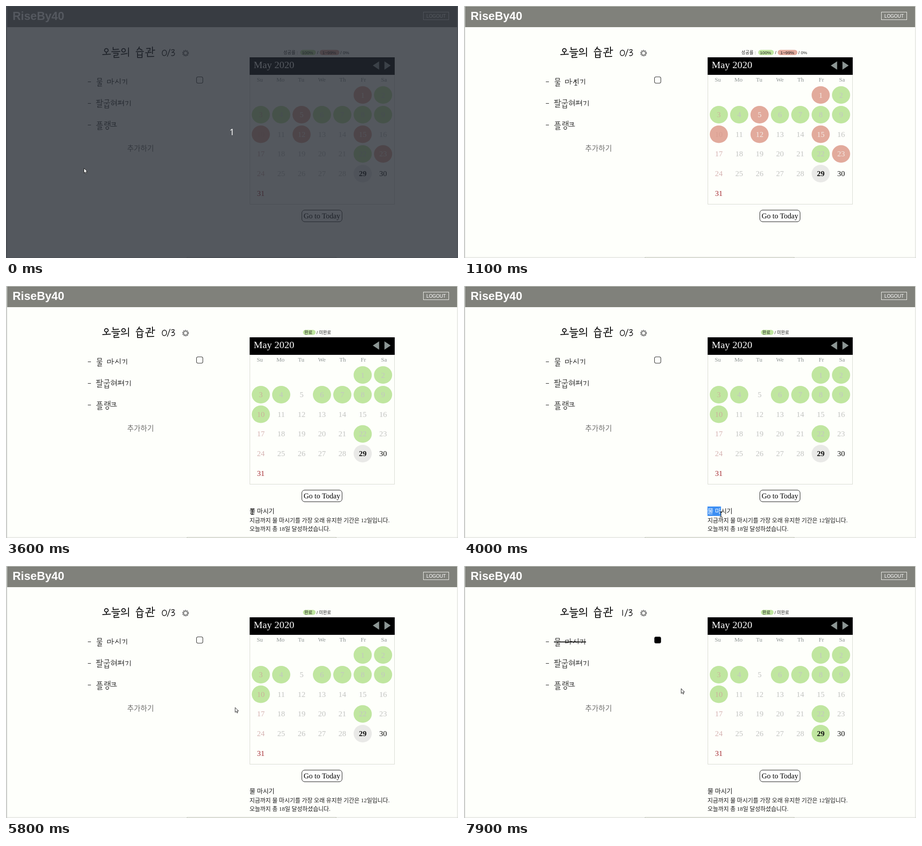
Write an HTML page that moves like this. It is 1000 px wide and 560 px high and loops after 8000 ms.

```html
<!DOCTYPE html>
<html lang="ko">
<head>
<meta charset="utf-8">
<title>오늘의 습관</title>
<style>
html, body { margin: 0; width: 100%; height: 100%; overflow: hidden; background: #fefffb; }
svg { display: block; width: 1000px; height: 560px; }
text { white-space: pre; }
.sans { font-family: "Liberation Sans", "Noto Sans CJK KR", sans-serif; }
.serif { font-family: "Liberation Serif", "Noto Sans CJK KR", serif; }
.cjk { font-family: "Noto Sans CJK KR", sans-serif; }
.mid { text-anchor: middle; }
.pen { fill: none; stroke: #161616; stroke-linecap: round; stroke-linejoin: round; }
</style>
</head>
<body>
<svg id="stage" viewBox="0 0 1000 560">
  <defs><clipPath id="picked"></clipPath></defs>
  <rect width="1000" height="560" fill="#fefffb"/>
  <path d="M0 .5H1000M998.7 0V560M0 558.8H1000" stroke="#d3d5d0" fill="none"/>
  <rect width="2.4" height="560" fill="#c9cac8"/>
  <rect x="400.5" y="558.5" width="330" height="3" fill="#f2f3ec" stroke="#b9bcb2"/>
  <rect x="2.5" y="1" width="995.5" height="46" fill="#80817b"/>
  <text class="sans" x="14.5" y="31" font-size="25.4" font-weight="700" fill="#fff">RiseBy40</text>
  <rect x="923.5" y="13.5" width="56" height="17" fill="none" stroke="#f4f4f0"/>
  <text class="sans mid" x="951.5" y="25.7" font-size="10.2" fill="#fff">LOGOUT</text>

  <g id="hand"></g>
  <g id="gear" fill="none" stroke="#6b6b6b">
    <circle cx="397.3" cy="104.8" r="6.4" stroke-width="1.8" stroke-dasharray="2.2 1.82"/>
    <circle cx="397.3" cy="104.8" r="4.5" stroke="#777" stroke-width="2.6"/>
    <circle cx="397.3" cy="104.8" r="4.6" stroke="#b5b5b5" stroke-width=".8"/>
  </g>
  <rect id="box" x="421.5" y="157.5" width="14" height="14" rx="3.5" stroke="#2b2b2b" stroke-width="1.1"/>
  <path id="strike" d="M199 168.8H270" stroke="#111" stroke-width="1.9"/>
  <text class="cjk" x="268" y="322" font-size="16.1" fill="#6f6f6d">추가하기</text>

  <g id="summary" class="sans" font-size="9.7" fill="#222">
    <rect x="651" y="97.5" width="34.5" height="11.5" rx="5.7" fill="#c0e6a0"/>
    <rect x="694" y="97.5" width="43.5" height="11.5" rx="5.7" fill="#e2aa9c"/>
    <text x="613.6" y="106.7">성공률 :</text>
    <text x="654.7" y="106.7">100%</text>
    <text x="688.3" y="106.7">/</text>
    <text x="700" y="106.7">1~99%</text>
    <text x="739.8" y="106.7">/ 0%</text>
  </g>
  <g id="detail" class="sans" font-size="9.7" fill="#222">
    <rect x="657" y="97.5" width="28" height="11" rx="5.5" fill="#c0e6a0"/>
    <text x="660" y="106.7">완료</text>
    <text x="687" y="106.7">/ 미완료</text>
  </g>

  <rect x="539.5" y="114.5" width="320" height="326" fill="none" stroke="#d6d9d1"/>
  <rect x="539" y="114" width="321" height="39" fill="#000"/>
  <text class="serif" x="548" y="138" font-size="22" fill="#fff">May 2020</text>
  <path d="M811.5 132.3L825.5 123V141.6ZM851 132.3L837.3 123V141.6Z" fill="#8d9795"/>
  <g id="week" class="serif mid" font-size="13" fill="#8d9493"></g>
  <g id="days" class="serif mid" font-size="17"></g>
  <rect x="654.5" y="453.5" width="89" height="26" rx="6.5" fill="#fff" stroke="#111"/>
  <text class="serif mid" x="699" y="472.3" font-size="16.3" fill="#000">Go to Today</text>

  <g id="note"></g>
  <g id="marked"></g>
  <g id="veil">
    <rect width="1000" height="560" fill="#242933" fill-opacity=".78"/>
    <text class="mid" x="500" y="287" font-size="19" fill="#fff" font-family="Noto Sans, sans-serif">1</text>
  </g>
  <path id="arrow" d="M.5 .5V11.2L3 9L4.7 12.7L6.4 11.9L4.8 8.2H8Z" fill="#fff" stroke="#1c1c1c"/>
  <path id="beam" d="M-3 -6Q-.3 -6 0 -5Q.3 -6 3 -6M0 -5V5M-3 6Q-.3 6 0 5Q.3 6 3 6" fill="none" stroke="#1c1c1c" stroke-width="1.2"/>
</svg>
<script>
const LOOP = 8000, TICK = 100;
const $ = id => document.getElementById(id);

function add(parent, tag, attrs, text) {
  const el = document.createElementNS("http://www.w3.org/2000/svg", tag);
  for (const k in attrs) el.setAttribute(k, attrs[k]);
  if (text) el.textContent = text;
  return parent.appendChild(el);
}
const show = (el, on) => el.setAttribute("visibility", on ? "visible" : "hidden");

// Handwritten lettering: label, pen width, strokes
const slashThree = "M357 112L363 96M366 98Q373 95 372 99Q371 102 367 103Q374 103 373 107Q371 112 366 110";
const words = [
  ["오늘의", 2,
    "M222 94.500a4 4 0 1 0 .1 0zM222 103V107M214 108L231 107" +
    "M237 92V97L249 96M234 101.500L252 101M238 105H248L247.500 109L239 110V114.500L250 114" +
    "M260 94.500a4 4 0 1 0 .1 0zM255 107.500L268 105.500M271 93V112"],
  ["습관", 2,
    "M295 91Q294 95 290 98M294.500 94.500L301 98M288 101.500L304 101M291 104V114.500H301V104M291 109H301" +
    "M311 94.500L319 94L318 100M315 99V103M309 104L321 103M324 91V106M324 98.500L329 98M313 106V112.500L327 112"],
  ["물", 1.15,
    "M203 160.500V165H211V160.500ZM201 168.500L213 168M207 168.500V172M203 172H211V175H203.500V178.500L212 178"],
  ["마시기", 1.15,
    "M224.500 165V171L231 170.500V164.500ZM235 161V174M235 167.500H239" +
    "M246 163Q245 168 242 171M245 166.500L249 170M252.500 161V173M257 164.500L263 164Q263 168 260 171.500M267 162V174"],
  ["팔굽혀펴기", 1.15,
    "M200 209.500L208 209M202.500 209.500V214.500M205.500 209.500V214M199.500 215L208.500 214M211 207V217M211 212H215" +
    "M202 218.500H211V221.500L203 222V225.500L212 225M219 208.500L227 208L226 213M216 215.500L230 215M223 215.500V218.500" +
    "M219 219V227H227V219M219 223H227"],
  ["", 1.15,
    "M234 209.500H238M232 212.500L240 212M236 215a2.500 2.500 0 1 0 .1 0zM244 208V222M240.500 213.500H244M240.500 217H244" +
    "M248 211.500L255 211M250 211.500V217M253 211.500V217M247 218L256 217M260 209V222M256.500 213.500H260M256.500 216.500H260" +
    "M264 212.500L270 212Q270 216 267 220M275 210V222"],
  ["플랭크", 1.15,
    "M202 257.500L212 257M205 257.500V262M209 257.500V262M202 262.500L212 262M200 265.500L214 265" +
    "M203 268.500H211V271.500H203.500V275L213 274.500M218 257.500H223V260.500L218.500 261V264.500L224 264" +
    "M226.500 256V266M226.500 261H230M230 255V267M224 268a3.200 3.200 0 1 0 .1 0z" +
    "M234 259.500L242 259L241 266M235 263L241 262.500M232 267.500L245 267"],
  ["–", 1.15, "M181.500 168.500H187.500M181.500 216.500H187.500M181.500 264.500H187.500"]
];
function write([label, width, d]) {
  const attrs = { class: "pen", "stroke-width": width, d };
  if (label) Object.assign(attrs, { role: "img", "aria-label": label });
  return add($("hand"), "path", attrs);
}
words.forEach(write);
const none = write(["0/3", 1.5, "M350.500 98C344 99 344 110 350 110.500C357 110 357 98 350.500 98Z" + slashThree]);
const one = write(["1/3", 1.5, "M351 98V110"]);
add($("hand"), "path", { class: "pen", "stroke-width": 1.5, d: slashThree, transform: "translate(-1 0)" });
const oneTail = $("hand").lastChild;

// Calendar
["Su", "Mo", "Tu", "We", "Th", "Fr", "Sa"].forEach((name, i) =>
  add($("week"), "text", { x: 561.5 + i * 45.8, y: 168 }, name));

const TODAY = 29, GREEN = "#c0e6a0", PINK = "#e2aa9c";
const full = [2, 3, 4, 6, 7, 8, 9, 22], part = [1, 5, 10, 12, 15, 23];
const kept = [1, 2, 3, 4, 6, 7, 8, 9, 10, 22];
const cells = Array.from({ length: 31 }, (_, i) => {
  const day = i + 1, slot = day + 4;
  const x = 563.8 + (slot % 7) * 45.07, y = 197.8 + Math.floor(slot / 7) * 43.65;
  const disc = add($("days"), "ellipse", { cx: x, cy: y, rx: 20.1, ry: 19.5 });
  const num = add($("days"), "text", { x, y: y + 5.7 }, String(day));
  if (day === TODAY) num.setAttribute("font-weight", 700);
  return { day, sunday: slot % 7 === 0, disc, num };
});

function discColor(day, detail, done) {
  if (day === TODAY) return done ? GREEN : "#e9e9e7";
  if (detail) return kept.includes(day) ? GREEN : "none";
  return full.includes(day) ? GREEN : part.includes(day) ? PINK : "none";
}
function numColor({ day, sunday }, fill) {
  if (day >= TODAY) return sunday ? "#a83238" : "#111";
  if (sunday) return fill === PINK ? "#d99f93" : fill === GREEN ? "#cbb09b" : "#d6b3b2";
  return fill === PINK ? "#f3e9e5" : "#c3c4c2";
}
function paintDays(detail, done) {
  for (const c of cells) {
    const fill = discColor(c.day, detail, done);
    c.disc.setAttribute("fill", fill);
    c.num.setAttribute("fill", numColor(c, fill));
  }
}

// Note under the calendar and its selection
const LEFT = 538.7;
const lines = [
  { text: "물 마시기", size: 14.1, base: 505.3, top: 490, bottom: 511, right: 597 },
  { text: "지금까지 물 마시기를 가장 오래 유지한 기간은 12일입니다.", size: 12.83, base: 525, top: 511, bottom: 530, right: 852 },
  { text: "오늘까지 총 18일 달성하셨습니다.", size: 12.83, base: 544.2, top: 530, bottom: 550, right: 718 }
];
const bars = [];
for (const l of lines) {
  const r = { x: LEFT, y: l.top, height: l.bottom - l.top, width: 0 };
  bars.push([add($("marked"), "rect", { ...r, fill: "#3d8ff3" }), add($("picked"), "rect", r)]);
}
const light = add($("marked"), "g", { "clip-path": "url(#picked)", "aria-hidden": true });
for (const [group, fill] of [[$("note"), "#1b1b1b"], [light, "#fff"]])
  for (const l of lines)
    add(group, "text", { class: "serif", x: LEFT, y: l.base, "font-size": l.size, fill }, l.text);

function select(x, y) {
  lines.forEach((l, i) => {
    const last = i === lines.length - 1;
    const end = y < l.top ? LEFT : y >= l.bottom && !last ? l.right : Math.min(x, l.right);
    for (const bar of bars[i]) bar.setAttribute("width", Math.max(0, end - LEFT));
  });
}

// Pointer moves: start, number of ticks, end point
const moves = [
  [600, 5, 240, 154], [1100, 1, 247.5, 170.5], [2100, 4, 537.5, 447], [3000, 1, 537.5, 465.5],
  [3200, 3, 547, 501.5], [3600, 1, 545, 502], [3900, 9, 731.5, 547],
  [5600, 3, 506.5, 314], [6000, 8, 429, 165.5], [7800, 2, 480, 272]
];
function pointer(t) {
  let x = 172, y = 360;
  for (const [start, ticks, tx, ty] of moves) {
    if (t < start) break;
    const p = Math.min(1, (Math.floor((t - start) / TICK) + 1) / ticks);
    const e = p * p * (3 - 2 * p);
    x += (tx - x) * e;
    y += (ty - y) * e;
  }
  return [x, y];
}
const between = (t, a, b) => t >= a && t < b;

let lastState = "";
function draw(t) {
  const detail = t >= 1600, done = t >= 7200;
  const state = `${detail}${done}`;
  if (state !== lastState) paintDays(detail, done);
  lastState = state;

  show($("veil"), t < 100);
  show($("summary"), !detail);
  show($("detail"), detail);
  show($("note"), detail);
  show($("strike"), done);
  show(none, !done);
  show(one, done);
  show(oneTail, done);
  $("box").setAttribute("fill", done ? "#000" : "#fefffb");

  const [x, y] = pointer(t);
  const beam = between(t, 1100, 2100) || between(t, 3300, 4700);
  show($("beam"), beam);
  show($("arrow"), !beam);
  $(beam ? "beam" : "arrow").setAttribute("transform", `translate(${x} ${y})`);

  const marking = between(t, 3900, 5100);
  show($("marked"), marking);
  if (marking) select(x, y);
}

const origin = performance.now();
function frame() {
  draw((performance.now() - origin) % LOOP);
  requestAnimationFrame(frame);
}
draw(0);
requestAnimationFrame(frame);
</script>
</body>
</html>
```
